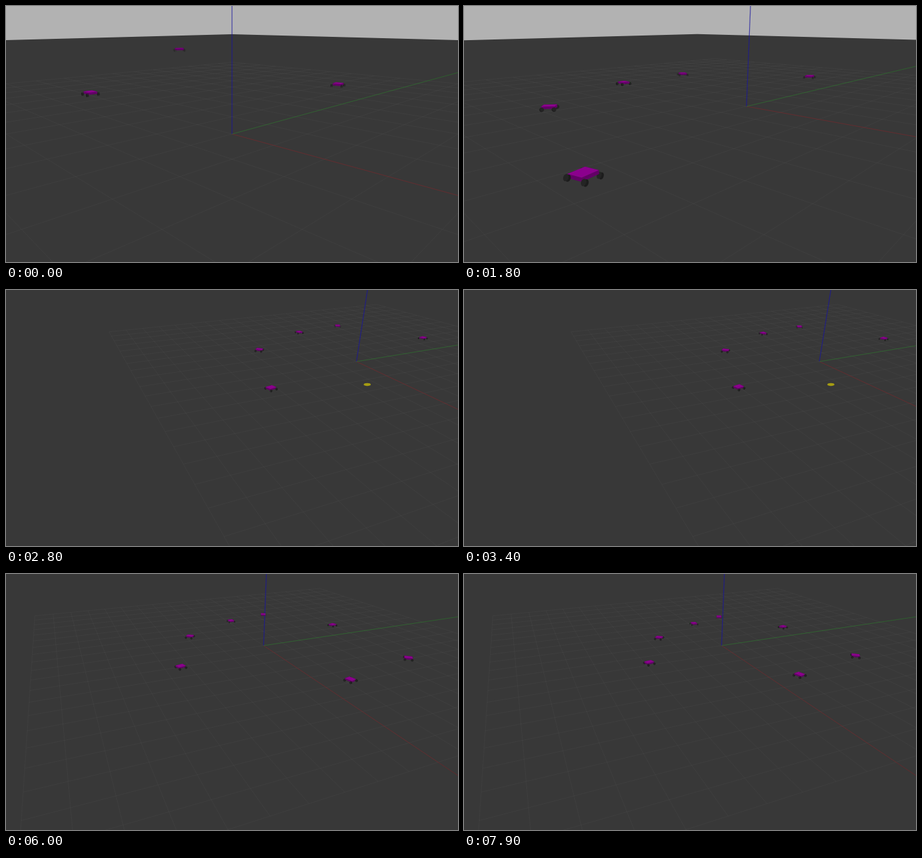
Recreate the animation shown at these times as an HTML page with a canvas. Size 688x390 px, loop 8 s.

```html
<!DOCTYPE html>
<html>
<head>
<meta charset="utf-8">
<style>
html, body { margin: 0; width: 100%; height: 100%; overflow: hidden; background: #383838; }
canvas { display: block; }
</style>
</head>
<body>
<canvas id="stage" width="688" height="390"></canvas>
<script>
const ctx = document.getElementById('stage').getContext('2d');
const W = 688, H = 390, LOOP = 8000, STEP = 100;
const FOCAL = W / 2 / Math.tan(Math.PI / 6);
const NEAR = 0.1, MID = 0.08;

// Views: distance ahead and right to the world origin, height, pitch, yaw in degrees
const START = { ahead: 7.071, side: 0, h: 2, pitch: 0.2756, yaw: 135 };
const BACK = { ahead: 9.9, side: 1.455, h: 2.06, pitch: 0.2756, yaw: 135 };
const HIGH = { ahead: 17.6, side: 5.85, h: 6.18, pitch: 0.481, yaw: 156.8 };
const RIGHT = { ...HIGH, side: 6.1 };
const LEFT = { ...HIGH, side: 1.49 };

// Robot centres on screen at the key times of the low and the high views
const LOW_T = [0, 1800, 2600], HIGH_T = [3400, 4300, 6000, 7900];
const ROBOTS = [
  { low: [null, [182, 257], [198, 249]],
    high: [[418, 148], [251, 146], [266, 141], [282, 135]] },
  { low: [null, [130, 154], [144, 154]],
    high: [[398, 92], [266, 93.5], [280, 95], [297, 97]] },
  { low: [[128.5, 132.5], [243, 117], [250, 118]],
    high: [[455.5, 66], [336.5, 68.5], [342.5, 71.5], [350, 75.5]] },
  { low: [[265.5, 112], [333, 103.5], [334, 104.5]],
    high: [[510.5, 56], [394, 58], [391.5, 62], [388, 65.5]], hop: true },
  { low: [[505.5, 119.5], [526, 107.5], [523, 109]],
    high: [[639, 74], [507.5, 75.5], [497, 77.5], [485.5, 80.5]] },
  { high: [null, [627, 131], [612.5, 128], [596, 124.5]] },
  { high: [null, [538.5, 169.5], [524.5, 161], [511, 153.5]] }
];

const mix = (a, b, k) => a + (b - a) * k;
const clamp = k => Math.max(0, Math.min(1, k));

function blend(a, b, k) {
  const e = clamp(k), s = e * e * (3 - 2 * e), out = {};
  for (const key in a) out[key] = mix(a[key], b[key], s);
  return out;
}

function viewAt(t) {
  let v;
  if (t < 2700) v = blend(START, BACK, (t - 1000) / 500);
  else if (t < 3700) v = blend(HIGH, RIGHT, (t - 2700) / 600);
  else v = blend(RIGHT, LEFT, (t - 3600) / 600);
  const yaw = v.yaw * Math.PI / 180;
  return { ...v, c: Math.cos(v.pitch), s: Math.sin(v.pitch), cy: Math.cos(yaw), sy: Math.sin(yaw) };
}

function toCam(v, [x, y, z]) {
  const f = x * v.cy + y * v.sy + v.ahead;
  const r = x * v.sy - y * v.cy + v.side;
  const d = z - v.h;
  return [r, f * v.s + d * v.c, f * v.c - d * v.s];
}

const toScreen = ([r, u, d]) => [W / 2 + FOCAL * r / d, H / 2 - FOCAL * u / d];
const project = (v, p) => toScreen(toCam(v, p));

function onGround(v, [px, py]) {
  const a = (px - W / 2) / FOCAL, b = (H / 2 - py) / FOCAL;
  const k = (v.h - MID) / (v.s - b * v.c);
  const f = k * (v.c + b * v.s) - v.ahead, r = k * a - v.side;
  return [f * v.cy + r * v.sy, f * v.sy - r * v.cy];
}

function buildTrack(times, spots) {
  return times.map((t, i) => ({ t, spot: spots[i] }))
    .filter(k => k.spot)
    .map(k => ({ t: k.t, pos: onGround(viewAt(k.t), k.spot) }));
}

for (const bot of ROBOTS) {
  bot.highTrack = buildTrack(HIGH_T, bot.high);
  bot.lowTrack = bot.low ? buildTrack(LOW_T, bot.low) : bot.highTrack;
}

function robotPos(bot, t) {
  const track = t < 2700 ? bot.lowTrack : bot.highTrack;
  let i = 0;
  while (i < track.length - 2 && t > track[i + 1].t) i++;
  const a = track[i], b = track[i + 1], k = (t - a.t) / (b.t - a.t);
  return [mix(a.pos[0], b.pos[0], k), mix(a.pos[1], b.pos[1], k)];
}

function clipNear(a, b) {
  const k = (NEAR - a[2]) / (b[2] - a[2]);
  return a.map((n, i) => mix(n, b[i], k));
}

function line(v, p, q, color, width = 1) {
  let a = toCam(v, p), b = toCam(v, q);
  if (a[2] < NEAR && b[2] < NEAR) return;
  if (a[2] < NEAR) a = clipNear(a, b);
  if (b[2] < NEAR) b = clipNear(b, a);
  ctx.strokeStyle = color;
  ctx.lineWidth = width;
  ctx.beginPath();
  ctx.moveTo(...toScreen(a));
  ctx.lineTo(...toScreen(b));
  ctx.stroke();
}

function fillPoly(v, pts, color) {
  const cam = pts.map(p => toCam(v, p)), out = [];
  cam.forEach((a, i) => {
    const b = cam[(i + 1) % cam.length];
    if (a[2] >= NEAR) out.push(a);
    if ((a[2] >= NEAR) !== (b[2] >= NEAR)) out.push(clipNear(a, b));
  });
  if (!out.length) return;
  ctx.fillStyle = color;
  ctx.beginPath();
  out.forEach(p => ctx.lineTo(...toScreen(p)));
  ctx.fill();
}

function drawWorld(v) {
  ctx.fillStyle = '#b2b2b2';
  ctx.fillRect(0, 0, W, H);
  fillPoly(v, [[-50, -50, 0], [-50, 50, 0], [50, 50, 0], [50, -50, 0]], '#383838');
  for (let i = -10; i <= 10; i++) {
    line(v, [i, -10, 0], [i, 10, 0], 'rgba(255,255,255,0.03)');
    line(v, [-10, i, 0], [10, i, 0], 'rgba(255,255,255,0.03)');
  }
  line(v, [0, 0, 0], [30, 0, 0], 'rgba(130,30,36,0.55)');
  line(v, [0, 0, 0], [0, 30, 0], 'rgba(40,120,40,0.6)');
  line(v, [0, 0, 0], [0, 0, 10], 'rgba(25,22,160,0.72)', 1.2);
}

function drawRobot(v, [x, y], lift) {
  const len = Math.hypot(x, y), hx = -x / len, hy = -y / len;
  const at = (f, s, z) => [x + hx * f - hy * s, y + hy * f + hx * s, z + lift];
  const center = toCam(v, at(0, 0, MID));
  if (center[2] < 1) return;

  const wheel = (f, s) => {
    for (const [off, color] of [[-0.02, '#1c1c1c'], [0.02, '#242424']]) {
      const rim = [];
      for (let a = 0; a < 6.28; a += 0.524) {
        rim.push(at(f + 0.05 * Math.cos(a), s + off, 0.05 + 0.05 * Math.sin(a)));
      }
      fillPoly(v, rim, color);
    }
  };
  const wheels = [[1, 1], [1, -1], [-1, 1], [-1, -1]].map(([f, s]) => [f * 0.145, s * 0.165]);
  const depth = ([f, s]) => toCam(v, at(f, s, MID))[2];
  wheels.sort((a, b) => depth(b) - depth(a));

  wheels.slice(0, 2).forEach(w => wheel(...w));
  const base = [[0.16, 0.13], [0.16, -0.13], [-0.16, -0.13], [-0.16, 0.13]];
  base.forEach((p, i) => {
    const q = base[(i + 1) % 4];
    fillPoly(v, [at(...p, 0.06), at(...q, 0.06), at(...q, 0.12), at(...p, 0.12)], '#620066');
  });
  fillPoly(v, base.map(p => at(...p, 0.12)), '#8b008d');
  wheels.slice(2).forEach(w => wheel(...w));
}

function drawPivot(v, t) {
  if (t < 2700 || t >= 4500) return;
  const [x, y] = project(v, t < 3700 ? [2.41, -1.4, 0] : [2.5, 0.84, 0]);
  ctx.fillStyle = '#a59c12';
  ctx.beginPath();
  ctx.ellipse(x, y + 0.5, 5.4, 2.3, 0, 0, 7);
  ctx.fill();
}

function draw(t) {
  const v = viewAt(t), s = t / 1000;
  drawWorld(v);
  drawPivot(v, t);
  for (const bot of ROBOTS) {
    const lift = bot.hop ? Math.max(0, 1.05 + 3 * s - 4.9 * s * s) : 0;
    drawRobot(v, robotPos(bot, t), lift);
  }
}

const begin = performance.now();
function tick() {
  const t = (performance.now() - begin) % LOOP;
  draw(Math.floor(t / STEP) * STEP);
  requestAnimationFrame(tick);
}
tick();
</script>
</body>
</html>
```
